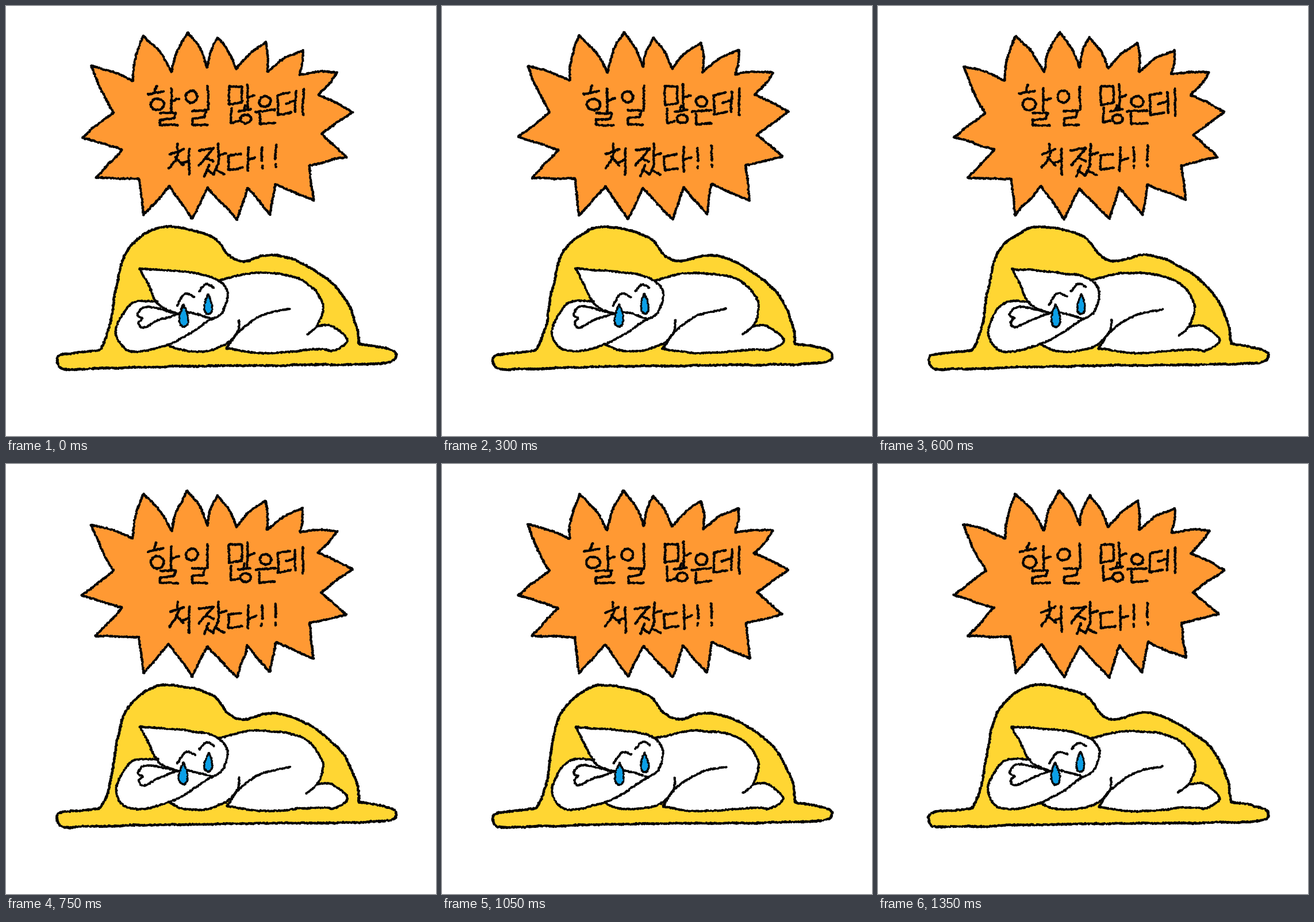
Recreate the animation shown at these times as an HTML page with a canvas. Size 748x748 px, loop 1.5 s.

```html
<!DOCTYPE html>
<html lang="ko">
<head>
<meta charset="utf-8">
<style>
  html, body { margin: 0; width: 100%; height: 100%; overflow: hidden; background: #fff; }
  canvas { display: block; width: 748px; height: 748px; }
</style>
</head>
<body>
<canvas id="stage" width="748" height="748" role="img" aria-label="할일 많은데 쳐잤다!!"></canvas>
<script>
const ctx = document.getElementById('stage').getContext('2d');
const POSE_MS = 150, POSES = 10;
const INK = '#050505', ORANGE = '#ff9933', YELLOW = '#ffd633', BLUE = '#0c9fe6';

// Smooth curve through the knots; a doubled knot is a sharp corner.
function spline(knots) {
  const at = i => knots[Math.max(0, Math.min(knots.length - 1, i))];
  const out = [];
  for (let i = 0; i < knots.length - 1; i++) {
    const [a, b, c, d] = [at(i - 1), at(i), at(i + 1), at(i + 2)];
    const n = Math.ceil(Math.hypot(c[0] - b[0], c[1] - b[1]) / 1.2);
    for (let k = 0; k < n; k++) {
      const t = k / n;
      out.push([0, 1].map(j => b[j] + 0.5 * t * (c[j] - a[j] +
        t * (2 * a[j] - 5 * b[j] + 4 * c[j] - d[j] +
        t * (3 * (b[j] - c[j]) + d[j] - a[j])))));
    }
  }
  out.push(at(knots.length));
  return out;
}

const parse = text => text.trim().split(/\s+/).map(w => w.split(',').map(Number));

// "x,y" words; "*" marks a corner.
const curve = text => spline(parse(text.replace(/\*(\S+)/g, '$1 $1')));

function ring(cx, cy, rx, ry) {
  const n = Math.ceil(5 * Math.max(rx, ry));
  return Array.from({ length: n + 1 }, (_, i) => {
    const a = i / n * 2 * Math.PI;
    return [cx + rx * Math.cos(a), cy + ry * Math.sin(a)];
  });
}

function teardrop(cx, top, w, h) {
  return Array.from({ length: 81 }, (_, i) => {
    const a = i / 80 * 2 * Math.PI;
    return [cx + w * Math.sin(a) * Math.sin(a / 2), top + h * (1 - Math.cos(a)) / 2];
  });
}

// Tips and notches clockwise; the sides of the upper spikes bow outward.
function spikes(text) {
  const p = parse(text), knots = [];
  p.forEach((a, i) => {
    const b = p[(i + 1) % p.length];
    const x = (a[0] + b[0]) / 2, y = (a[1] + b[1]) / 2;
    const bow = Math.max(0, (200 - y) / 1800);
    knots.push(a, a, [x + bow * (b[1] - a[1]), y - bow * (b[0] - a[0])]);
  });
  return spline([...knots, p[0], p[0]]);
}

const burst = spikes(`239,52 288,115 316,46 350,107 368,55 401,109 451,64 454,114
  516,77 511,119 576,116 544,155 602,184 548,223 592,262 528,277 535,338 469,310
  460,362 420,316 402,371 350,317 324,370 284,314 239,364 231,301 156,299 202,250
  132,228 187,186 149,105 221,130`);

const puddle = curve(`89,621 95,607 150,601 167,594 182,550 192,490 208,431 245,395
  286,384 357,401 386,433 413,444 468,433 530,456 581,497 608,550 *614,588 665,597
  679,609 660,621 560,624 300,627 150,631 100,631 89,621`);

const back = curve('372,477 437,464 512,475 550,514 543,553 523,572');
const tail = curve('541,557 566,557 594,582 570,599 545,597 450,604 384,596');
const thigh = curve('384,596 410,562 449,537 494,527');
const chest = curve('406,546 403,568 382,589 345,600 306,599 282,588');
const head = curve('298,535 266,519 246,482 *233,457 345,468 383,492 378,530 357,545');
const arm = curve('264,514 220,517 192,560 204,594 240,600 300,581 357,544');
const hand = curve(`299,535 245,523 229,537 *237,543 231,551 239,559 270,545
  310,533 349,541 357,545`);
const eyes = ['298,521 312,501 329,506', '336,496 349,484 362,490'].map(curve);
const tears = [teardrop(308.5, 520, 10, 38), teardrop(352.5, 502, 9, 33)];

const bodyLines = [back, tail, thigh, chest, head, arm, hand, ...eyes];
const bodyFills = [[...back, ...tail, ...chest], head, arm];

// Pen strokes of each letter on a 0-9 grid, "xy" per point.
const JAMO = {
  'ㅎ': ['50 42', '03 92'], 'ㅇ': [], 'ㅏ': ['00 09', '05 94'], 'ㅣ': ['00 09'],
  'ㄹ': ['00 80 74 05 09 99'], 'ㅁ': ['00 09', '00 90 98 09'], 'ㄴ': ['00 09 98'],
  'ㅡ': ['09 90'], 'ㄷ': ['80 01 09 98'], 'ㅔ': ['05 54', '51 58', '90 99'],
  'ㅊ': ['50 52', '04 92', '63 46 09', '45 98'], 'ㅓ': ['05 94', '90 99'],
  'ㅈ': ['01 90 54 09', '45 97'], 'ㅆ': ['20 09', '14 48', '60 48', '54 98'],
  '!': ['00 06', '08 09']
};

function write(letter, x, y, w, h) {
  const strokes = JAMO[letter].map(s => spline(s.split(' ').flatMap(([u, v]) => {
    const p = [x + u / 9 * w, y + v / 9 * h];
    return [p, p];
  })));
  if (letter === 'ㅇ') strokes.push(ring(x + w / 2, y + h / 2, w / 2, h / 2));
  if (letter === 'ㅎ') strokes.push(ring(x + w * 0.62, y + h * 0.75, w * 0.41, h * 0.23));
  return strokes;
}

const lettering = [
  ['ㅎ', 246, 138, 28, 44], ['ㅏ', 288, 143, 13, 40], ['ㄹ', 268, 186, 31, 21],
  ['ㅇ', 313, 148, 20, 20], ['ㅣ', 351, 139, 0, 42], ['ㄹ', 324, 182, 26, 25],
  ['ㅁ', 388, 140, 22, 32], ['ㅏ', 420, 136, 12, 43], ['ㄴ', 392, 178, 13, 25],
  ['ㅎ', 404, 173, 22, 32], ['ㅇ', 441, 157, 20, 18], ['ㅡ', 434, 181, 34, 3],
  ['ㄴ', 441, 188, 27, 18], ['ㄷ', 473, 151, 23, 38], ['ㅔ', 487, 144, 30, 46],
  ['ㅊ', 284, 239, 25, 43], ['ㅓ', 307, 248, 12, 45],
  ['ㅈ', 336, 248, 25, 29], ['ㅏ', 369, 240, 13, 36], ['ㅆ', 345, 277, 35, 19],
  ['ㄷ', 387, 258, 24, 27], ['ㅏ', 421, 246, 13, 41],
  ['!', 445, 246, 1, 36], ['!', 469, 243, 1, 37]
].flatMap(args => write(...args));

const rand = n => {
  const s = Math.sin(n * 12.9898) * 43758.5453;
  return s - Math.floor(s);
};

// Smooth value noise in the plane, from -1 to 1.
function noise(x, y, seed) {
  const ix = Math.floor(x), iy = Math.floor(y);
  const ease = t => t * t * (3 - 2 * t);
  const u = ease(x - ix), v = ease(y - iy);
  const cell = (i, j) => rand((ix + i) * 1.37 + (iy + j) * 57.11 + seed * 7.93);
  const top = cell(0, 0) * (1 - u) + cell(1, 0) * u;
  const low = cell(0, 1) * (1 - u) + cell(1, 1) * u;
  return 2 * (top * (1 - v) + low * v) - 1;
}

const boil = (points, pose) => points.map(([x, y]) => [
  x + 1.2 * noise(x / 22, y / 22, pose + 1),
  y + 1.2 * noise(x / 22, y / 22, pose + 31)
]);

function fill(points, color, pose) {
  ctx.fillStyle = color;
  ctx.beginPath();
  for (const [x, y] of boil(points, pose)) ctx.lineTo(x, y);
  ctx.fill();
}

// Crayon line: overlapping dabs with uneven size and place.
function ink(points, pose, size) {
  ctx.fillStyle = INK;
  ctx.beginPath();
  boil(points, pose).forEach(([x, y], i) => {
    const n = points[0][0] + i * 3.17 + pose * 91.3;
    const r = size * (0.75 + 0.4 * rand(n));
    const px = x + 1.7 * (rand(n + 0.31) - 0.5);
    const py = y + 1.7 * (rand(n + 0.67) - 0.5);
    ctx.moveTo(px + r, py);
    ctx.arc(px, py, r, 0, 7);
  });
  ctx.fill();
}

function layer(pose, fills, color, lines, size) {
  for (const shape of fills) fill(shape, color, pose);
  for (const line of lines) ink(line, pose, size);
}

function draw(pose) {
  ctx.fillStyle = '#fff';
  ctx.fillRect(0, 0, 748, 748);
  layer(pose, [burst], ORANGE, [burst, ...lettering], 2.1);
  layer(pose, [puddle], YELLOW, [puddle], 2.2);
  layer(pose, bodyFills, '#fff', bodyLines, 2);
  layer(pose, tears, BLUE, tears, 1.7);
}

let shown = -1;
const start = performance.now();
function tick() {
  const pose = Math.floor((performance.now() - start) / POSE_MS) % POSES;
  if (pose !== shown) draw(shown = pose);
  requestAnimationFrame(tick);
}
tick();
</script>
</body>
</html>
```
